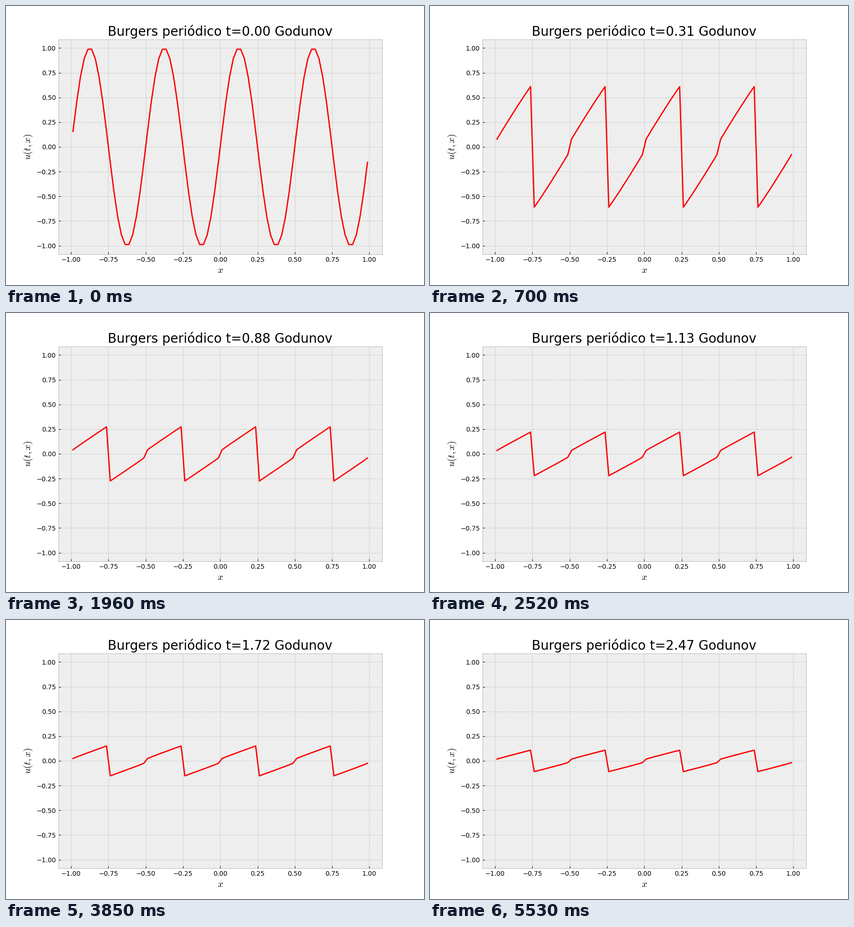
These frames come from a looping animation (900x600 px, 5.6 s). A matplotlib script:

```python
import matplotlib.pyplot as plt
import numpy as np
from matplotlib.animation import FuncAnimation

CELLS = 80
FRAMES = 80
STRIDE = 5                      # solver steps per drawn frame
T_END = 2.5
DX = 2 / CELLS
DT = T_END / (FRAMES * STRIDE - 1)


def godunov_flux(left, right):
    """Exact Riemann flux for f(u) = u^2 / 2."""
    return np.maximum(np.maximum(left, 0) ** 2, np.minimum(right, 0) ** 2) / 2


def step(u):
    flux = godunov_flux(u, np.roll(u, -1))
    return u - DT / DX * (flux - np.roll(flux, 1))


def solve(u):
    states = [u]
    for _ in range(FRAMES - 1):
        for _ in range(STRIDE):
            u = step(u)
        states.append(u)
    return states


x = -1 + DX * (np.arange(CELLS) + 0.5)
states = solve(np.sin(4 * np.pi * x))

plt.style.use("bmh")
plt.rcParams["font.family"] = "DejaVu Sans"
fig, ax = plt.subplots(figsize=(9, 6), dpi=100)
line, = ax.plot(x, states[0], color="red", lw=2)
ax.set_xlim(ax.get_xlim())
ax.set_ylim(ax.get_ylim())
ax.set_xlabel("$x$", fontsize=15)
ax.set_ylabel("$u(t,x)$", fontsize=15)
title = ax.set_title("", fontsize=20)


def draw(i):
    line.set_ydata(states[i])
    title.set_text(f"Burgers periódico t={i * STRIDE * DT:.2f} Godunov")
    return line, title


anim = FuncAnimation(fig, draw, frames=FRAMES, interval=70,
                     repeat=True, repeat_delay=0, blit=False)
plt.show()
```
